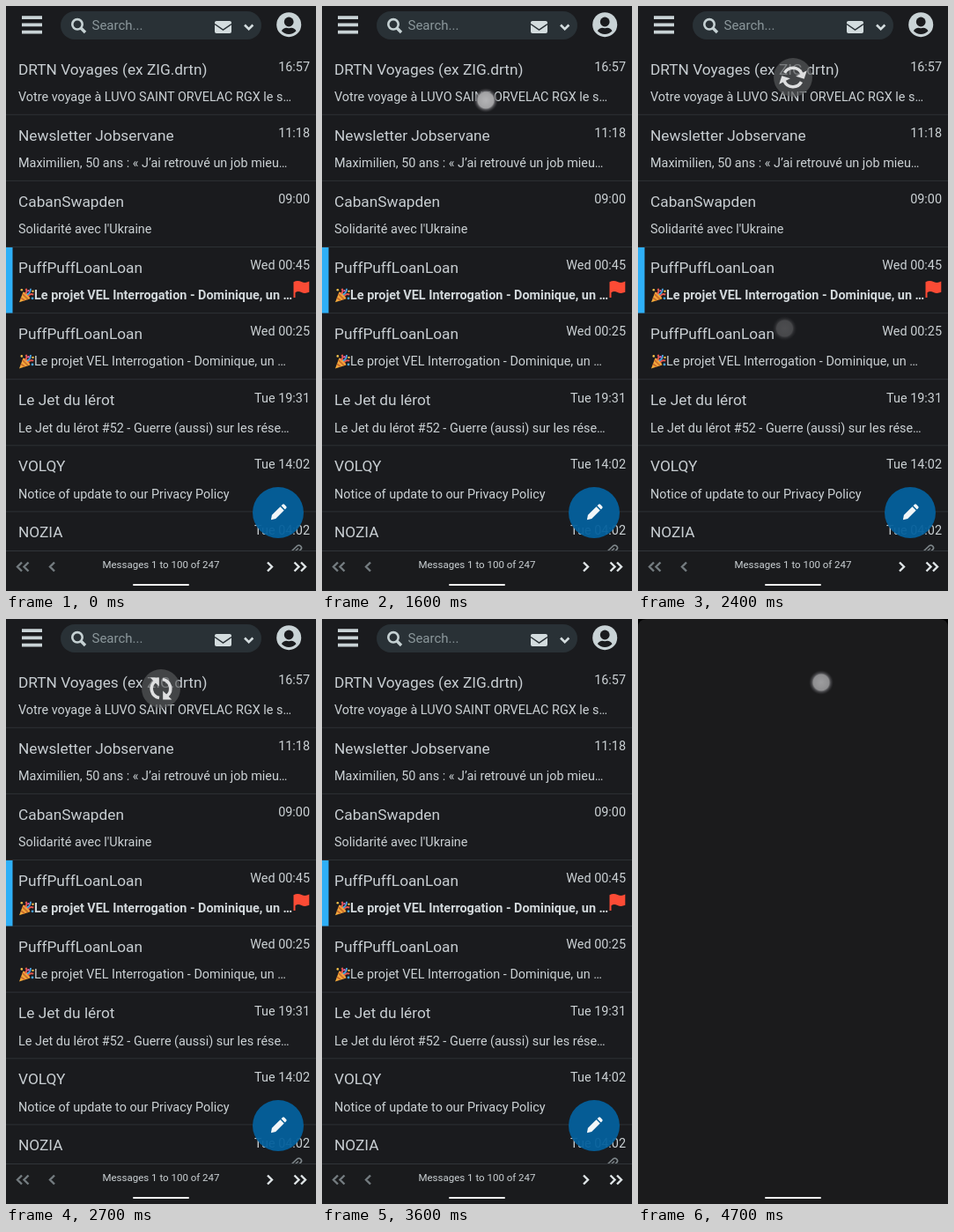
An HTML page that plays this animation: 352x664 px, repeating every 4.8 s.

```html
<!DOCTYPE html>
<html lang="en">
<head>
<meta charset="utf-8">
<title>Pull to refresh</title>
<style>
  html, body { margin: 0; width: 100%; height: 100%; overflow: hidden; background: #1a1b1e; }
  svg { display: block; width: 352px; height: 664px; }
  text { font: 14.4px Roboto, sans-serif; fill: #cbd1d4; }
  .from { font-size: 17.28px; fill: #c8ced2; }
  .bold { font-weight: 700; fill: #d2d8db; }
  .end { text-anchor: end; }
  .line { fill: none; stroke-linecap: butt; stroke-linejoin: miter; }
</style>
</head>
<body>
<svg viewBox="0 0 352 664">
  <defs>
    <g id="popper">
      <path d="M0 16L4.500 4.200Q10.500 5.500 12.500 12Z" fill="#f2a93b"/>
      <path d="M2 10.800L6.200 14M3.600 6.500L10 12.600" stroke="#c9692b" stroke-width="1.7"/>
      <path d="M6.500 6.500Q10 4 7.500 .500M10 9Q12 5.800 16.300 7.200" class="line" stroke="#e8584f" stroke-width="2"/>
      <path d="M8.700 7.300Q13 5.500 13 .500" class="line" stroke="#4aa3df" stroke-width="1.8"/>
      <g fill="#f2c14b"><circle cx="2.800" cy="2" r="1.300"/><circle cx="15.500" cy="3.500" r="1.200"/></g>
      <circle cx="15" cy="11.500" r="1.400" fill="#4aa3df"/>
      <circle cx="10.500" cy="2.800" r="1.200" fill="#d85fb4"/>
    </g>
    <g id="arrow">
      <path d="M-10.6 -2A10.8 10.8 0 0 1 8.2 -7" class="line" stroke="#dedfe0" stroke-width="3.6"/>
      <path d="M12.6 -12.3V-2.2H2.6Z" fill="#dedfe0"/>
    </g>
    <radialGradient id="glow">
      <stop offset="0" stop-color="#b4b4b6"/>
      <stop offset=".64" stop-color="#a2a2a4"/>
      <stop offset=".76" stop-color="#66666a" stop-opacity=".75"/>
      <stop offset="1" stop-color="#3a3a3d" stop-opacity="0"/>
    </radialGradient>
  </defs>

  <g id="app">
    <rect width="352" height="664" fill="#1a1b1e"/>
    <g id="list"></g>
    <rect y="274" width="7.500" height="74.500" fill="#2eaff7"/>
    <path d="M326.500 313.200Q331 311 335.500 313T344.300 312.600V324.800Q339.500 327 335.500 325T328.500 325.200V331H326.500Z" fill="#fb4b35"/>
    <path d="M323 620L331 612.500Q333.500 611.500 335 613.500T334.500 617L329 622M327 620L332 615.500" class="line" stroke="#7d8589" stroke-width="1.6"/>

    <g id="pull">
      <circle r="22" fill="#58595b" fill-opacity=".68"/>
      <g id="spin"><use href="#arrow"/><use href="#arrow" transform="rotate(180)"/></g>
    </g>

    <g id="header">
      <path d="M18 13.200H41M18 21.400H41M18 29.600H41" class="line" stroke="#c9d3d6" stroke-width="3.8"/>
      <rect x="62" y="6" width="228" height="32" rx="16" fill="#293136"/>
      <circle cx="81" cy="20.800" r="5.700" class="line" stroke="#c5d1d3" stroke-width="2.6"/>
      <path d="M84.800 24.800L90 30" class="line" stroke="#c5d1d3" stroke-width="3.4"/>
      <text x="97.500" y="27" style="font-size:15px;fill:#8b979b">Search...</text>
      <rect x="237" y="17" width="19" height="14" rx="2" fill="#d3dcde"/>
      <path d="M237 20.500L246.500 27.200L256 20.500" class="line" stroke="#293136" stroke-width="1.5"/>
      <path d="M271 21.500L275.700 26.200L280.400 21.500" class="line" stroke="#d3dcde" stroke-width="2.6"/>
      <g transform="translate(321.200 21.200)" fill="#1a1b1e">
        <circle r="14" fill="#c9d3d6"/>
        <circle cy="-3.200" r="5.400"/>
        <path d="M0 10.800C-3.300 10.800 -6.300 9.300 -8.300 7C-7.200 5 -5.100 3.600 -2.700 3.600Q0 4.500 2.700 3.600C5.100 3.600 7.200 5 8.300 7C6.300 9.300 3.300 10.800 0 10.800Z"/>
      </g>
    </g>

    <circle cx="309" cy="575" r="29" fill="#04609d" fill-opacity=".94"/>
    <g transform="translate(309 575) rotate(45)" fill="#f2f6f8">
      <path d="M-3 -6.500H3V7L0 11.500L-3 7Z"/>
      <path d="M-3 -8H3V-10Q3 -11.500 1.500 -11.500H-1.500Q-3 -11.500 -3 -10Z"/>
    </g>

    <g id="footer">
      <rect y="618" width="352" height="46" fill="#1a1b1d"/>
      <path d="M0 618.500H352" stroke="#303438"/>
      <path d="M18 631.500L13 636.500L18 641.500M25.500 631.500L20.500 636.500L25.500 641.500M55 631.500L50 636.500L55 641.500" class="line" stroke="#747c80" stroke-width="2.4"/>
      <path d="M297 631.500L302 636.500L297 641.500M327.500 631.500L332.500 636.500L327.500 641.500M335 631.500L340 636.500L335 641.500" class="line" stroke="#dfe5e7" stroke-width="2.4"/>
      <text x="176" y="638" text-anchor="middle" style="font-size:11.5px">Messages 1 to 100 of 247</text>
    </g>
  </g>

  <g id="blank">
    <rect width="352" height="664" fill="#000"/>
    <path d="M0 664V10Q0 0 10 0H342Q352 0 352 10V664Z" fill="#1b1b1c"/>
  </g>
  <rect x="144" y="656" width="64" height="2" rx="1" fill="#f1f1f1"/>
  <circle id="touch" r="14" fill="url(#glow)"/>
</svg>

<script>
const $ = id => document.getElementById(id);
const LOOP = 4800, STEP = 100, PITCH = 75.1;
const project = 'Le projet VEL Interrogation - Dominique, un …';
const mails = [
  ['DRTN Voyages (ex ZIG.drtn)', '16:57', 'Votre voyage à LUVO SAINT ORVELAC RGX le s…'],
  ['Newsletter Jobservane', '11:18', 'Maximilien, 50 ans : « J’ai retrouvé un job mieu…'],
  ['CabanSwapden', '09:00', "Solidarité avec l'Ukraine"],
  ['PuffPuffLoanLoan', 'Wed 00:45', project, 'bold'],
  ['PuffPuffLoanLoan', 'Wed 00:25', project, 'plain'],
  ['Le Jet du lérot', 'Tue 19:31', 'Le Jet du lérot #52 - Guerre (aussi) sur les rése…'],
  ['VOLQY', 'Tue 14:02', 'Notice of update to our Privacy Policy'],
  ['NOZIA', 'Tue 04:02', '']
];

$('list').innerHTML = mails.map(([from, time, subject, party], i) => `
  <g transform="translate(0 ${i * PITCH})">
    <text class="from" x="14" y="77.5">${from}</text>
    <text class="end" x="345" y="74">${time}</text>
    <text class="${party || ''}" x="${party ? 32 : 14}" y="108">${subject}</text>
    ${party ? '<use href="#popper" x="15" y="95"/>' : ''}
    <path d="M0 123.300H352" stroke="#2d3135"/>
  </g>`).join('');

// Keys are [time, value], joined by straight lines.
function track(keys, t) {
  let i = 1;
  while (i < keys.length - 1 && t > keys[i][0]) i++;
  const [t0, a] = keys[i - 1], [t1, b] = keys[i];
  const p = Math.min(1, Math.max(0, (t - t0) / (t1 - t0)));
  return a + (b - a) * p;
}

const touchX = [[1400, 192], [1600, 186], [2000, 170], [2400, 166.5]];
const touchY = [[1400, 82], [1600, 107], [1700, 146], [1900, 240], [2000, 280], [2200, 340], [2400, 366]];
const pullY = [[1700, 59], [2000, 82], [2400, 81], [2500, 79]];

const show = (id, on) => $(id).style.display = on ? '' : 'none';
const place = (id, x, y) => $(id).setAttribute('transform', `translate(${x} ${y})`);

function draw(t) {
  const blank = t >= 4700;
  show('app', !blank);
  show('blank', blank);

  show('touch', blank || (t >= 1400 && t <= 2400));
  if (blank) place('touch', 208, 72);
  else place('touch', track(touchX, t), track(touchY, t));
  $('touch').style.opacity = blank ? 0.85 : t === 2400 ? 0.33 : 1;

  show('pull', t >= 1700 && t < 3500);
  place('pull', 176, track(pullY, t));
  // One turn in 1.5 s once the finger lets go.
  const angle = Math.max(0, t - 2325) * 0.24;
  $('spin').setAttribute('transform', `rotate(${angle})`);
}

const start = performance.now();
function tick() {
  const t = (performance.now() - start) % LOOP;
  draw(Math.floor(t / STEP) * STEP);
  requestAnimationFrame(tick);
}
tick();
</script>
</body>
</html>
```
